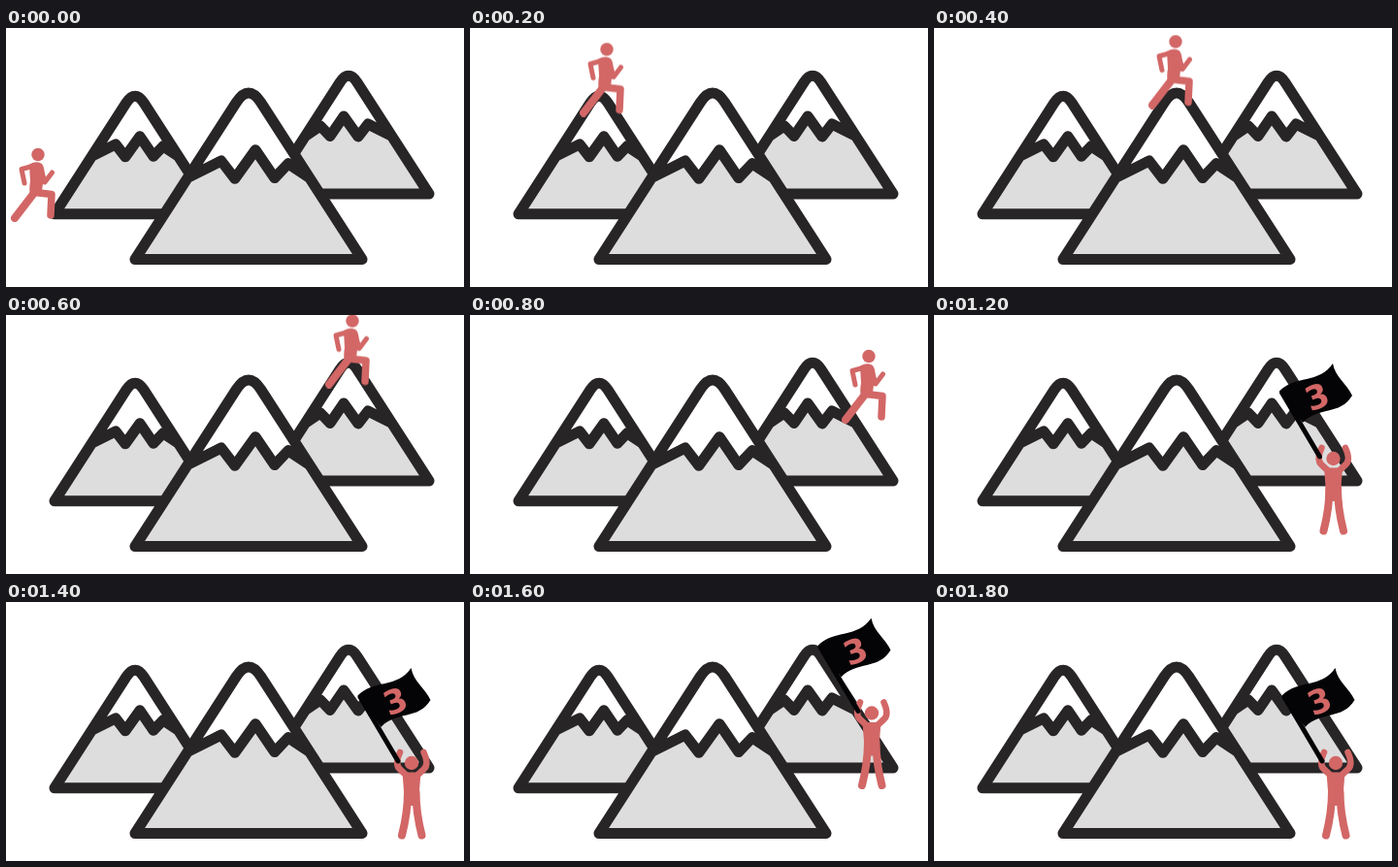
Write an HTML page that moves like this. It is 472 px wide and 267 px high and loops after 2 s.

```html
<!DOCTYPE html>
<html lang="en">
<head>
<meta charset="utf-8">
<title>Three peaks</title>
<style>
  html, body { margin: 0; width: 100%; height: 100%; overflow: hidden; background: #fff; }
  svg { display: block; width: 100vw; height: 100vh; }
  .ridge { fill: none; stroke: #272526; stroke-width: 11; }
  .rock { fill: #ddd; }
  .limb { fill: none; stroke: #d26766; }
  .skin { fill: #d26766; }
  .ridge, .limb, .pole { stroke-linecap: round; stroke-linejoin: round; }
  .cloth { fill: #040407; }
  .pole { stroke: #040407; stroke-width: 5; }
  text { font: bold 34px "DejaVu Sans", sans-serif; text-anchor: middle; }
</style>
</head>
<body>
<svg viewBox="0 0 472 267">
  <g id="peaks"></g>

  <g id="runner">
    <circle class="skin" cx="33" cy="130.5" r="6.7"/>
    <path class="skin" d="M24 140.5Q32 136.5 37 140Q40.5 145 39 153L36.5 172H25Q23.5 167 25 158Z"/>
    <path class="limb" stroke-width="5" d="M29 142L16 145.5L19 160M36 145L40 159L47.5 149"/>
    <path class="limb" stroke-width="8" d="M29 170L9 196"/>
    <path class="limb" stroke-width="7.5" d="M30 169.5L47 171.5L46 193"/>
  </g>

  <g id="winner">
    <circle class="skin" cx="410" cy="175" r="7.2"/>
    <path class="skin" d="M400.5 184.5H419.5L418 204V219H402V204Z"/>
    <g id="side">
      <path class="limb" stroke-width="6.5" d="M398 164Q392.500 176 397.500 181L405 188"/>
      <path class="limb" stroke-width="8" d="M406 205Q406 226 400 249.500"/>
    </g>
    <use href="#side" transform="translate(820.500) scale(-1 1)"/>
    <path class="pole" d="M357 107L396 173"/>
    <path class="cloth" d="M354.500 105.500C370 89 396 98 409.500 77C412 91 424 98 429.500 110C417 131 394 121 378.500 138Z"/>
    <text class="skin" transform="translate(393 111) rotate(-21)" y="12.4">3</text>
  </g>
</svg>
<script>
const BEAT = 200, BEATS = 10;
const HALF = 83, SLOPE = 1.55;
const zigzag = [[-20, -72], [-10, -59], [5, -80], [19, -59.5], [29, -70]];

// A point on the right or left flank, at distance x from the centre line.
const flank = x => [x, (Math.abs(x) - HALF) * SLOPE];

// x is the centre line, y the middle of the base stroke, k the scale; flip mirrors it.
function peak(x, y, k, flip = 1) {
  const path = points => points.map(([a, b]) => `${a * k * flip} ${b * k}`).join('L');
  const left = flank(-HALF), right = flank(HALF);
  const tip = path([flank(0)]);
  const body = `M${path([left, flank(-9)])}Q${tip} ${path([flank(9), right])}Z`;
  const snow = [flank(-44.5), ...zigzag, flank(44.5)];
  return `<g transform="translate(${x} ${y})">
    <path fill="#fff" d="${body}"/>
    <path class="rock" d="M${path([left, ...snow, right])}Z"/>
    <path class="ridge" d="${body}M${path(snow)}"/></g>`;
}

document.getElementById('peaks').innerHTML =
  peak(133, 191.8, 1) + peak(353, 171, 1, -1) + peak(250, 238.5, 1.41);

// Holds each pose for one beat, hiding the figure in all other beats.
function hop(id, first, poses) {
  const frames = Array.from({ length: BEATS + 1 }, (_, i) => {
    const pose = poses[i - first];
    const [x, y] = pose || [0, 0];
    return {
      offset: i / BEATS,
      transform: `translate(${x}px, ${y}px)`,
      opacity: pose ? 1 : 0,
      easing: 'step-end'
    };
  });
  document.getElementById(id).animate(frames, { duration: BEAT * BEATS, iterations: Infinity });
}

// Even strides from top to top, then one shorter step down the last flank.
const strides = [1, 2, 3].map(n => [108 * n, -100.5 - 8 * n]);
hop('runner', 0, [[0, 0], ...strides, [378, -88]]);
hop('winner', 5, [[0, 0], [1.5, -27], [8, -9], [4, -60.5], [4, -9]]);
</script>
</body>
</html>
```
